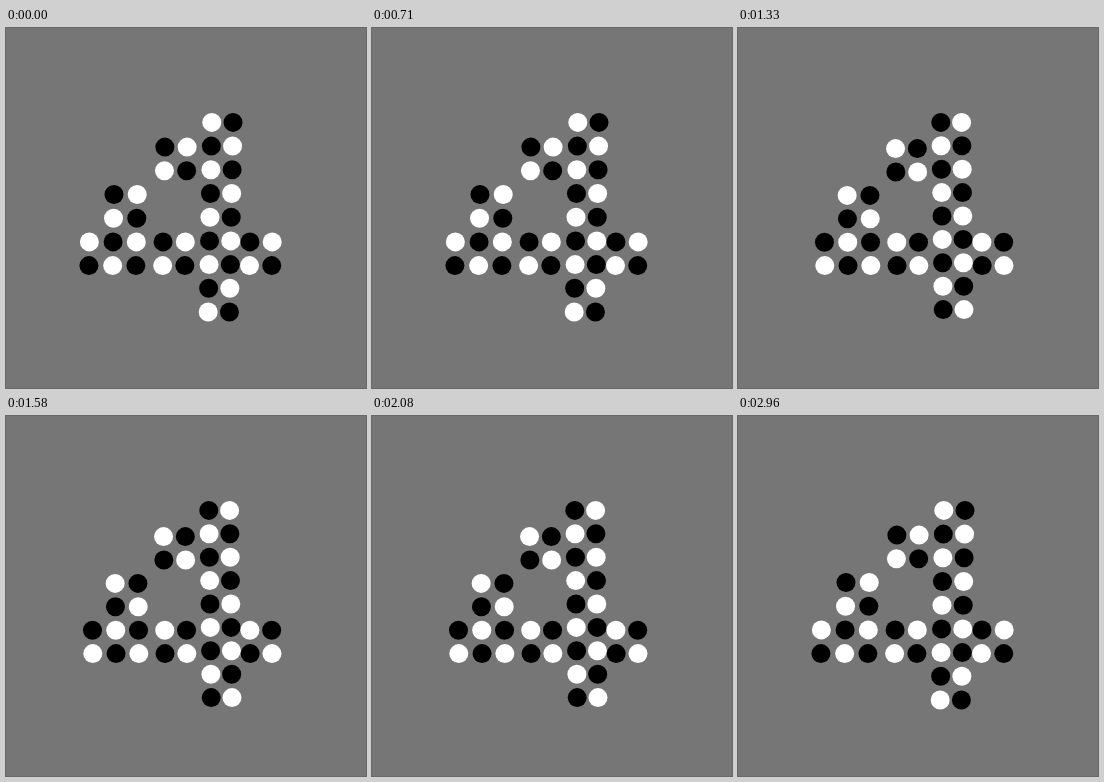
Recreate the animation shown at these times as an HTML page. Size 360x360 px, loop 3 s.

```html
<!DOCTYPE html>
<html lang="en">
<head>
<meta charset="utf-8">
<title>Flickering dots</title>
<style>
  html, body { margin: 0; width: 100%; height: 100%; overflow: hidden; background: #777677; }
  svg { display: block; width: 100vw; height: 100vh; }
</style>
</head>
<body>
<svg viewBox="0 0 360 360"></svg>
<script>
const LOOP = 3000;
const RADIUS = 9.5;
const TOP = 94.4;
const CENTRE = 204;

const SHAPE = [
  ".....##..",
  "...####..",
  "...####..",
  ".##..##..",
  ".##..##..",
  "#########",
  "#########",
  ".....##..",
  ".....##.."
];
const COLUMNS = [85, 108.5, 131.5, 158, 180, CENTRE, 225, 244, 266];

// lean: sideways drift per row; sag: drop of the dots beside the stem.
const REST = { white: 1, pitch: 23.7, lean: -0.45, spread: 1.01, sag: 1 };
const LIT = { white: 0, pitch: 23.4, lean: 0.3, spread: 0.99, sag: 2.8 };

const svg = document.querySelector("svg");

function add(parent, name, attrs = {}) {
  const node = document.createElementNS("http://www.w3.org/2000/svg", name);
  for (const key in attrs) node.setAttribute(key, attrs[key]);
  return parent.appendChild(node);
}

function drawPose({ white, pitch, lean, spread, sag }) {
  const group = add(svg, "g");
  SHAPE.forEach((line, row) => [...line].forEach((mark, col) => {
    if (mark !== "#") return;
    const inStem = col === 5 || col === 6;
    add(group, "circle", {
      cx: CENTRE + (COLUMNS[col] - CENTRE) * spread + (row - 4) * lean,
      cy: TOP + row * pitch + (inStem ? 0 : sag),
      r: RADIUS,
      fill: (row + col) % 2 === white ? "#fff" : "#000"
    });
  }));
  return group;
}

// Long-short-long pulse, twelve ticks per cycle at 24 ticks a second.
const PULSE = [0, 3, 4, 5, 6, 9];
const tickTime = tick => Math.round(tick * 100 / 24) * 10;
const switches = [];
for (let start = 8; start < 72; start += 12)
  for (const step of PULSE)
    if (start + step < 72) switches.push(tickTime(start + step));

function flicker(group, first) {
  const frames = [0, ...switches, LOOP].map((time, i) => ({
    offset: time / LOOP,
    opacity: i % 2 ? 1 - first : first,
    easing: "step-end"
  }));
  const anim = group.animate(frames, { duration: LOOP, iterations: Infinity });
  anim.startTime = document.timeline.currentTime;
}
flicker(drawPose(REST), 1);
flicker(drawPose(LIT), 0);
</script>
</body>
</html>
```
